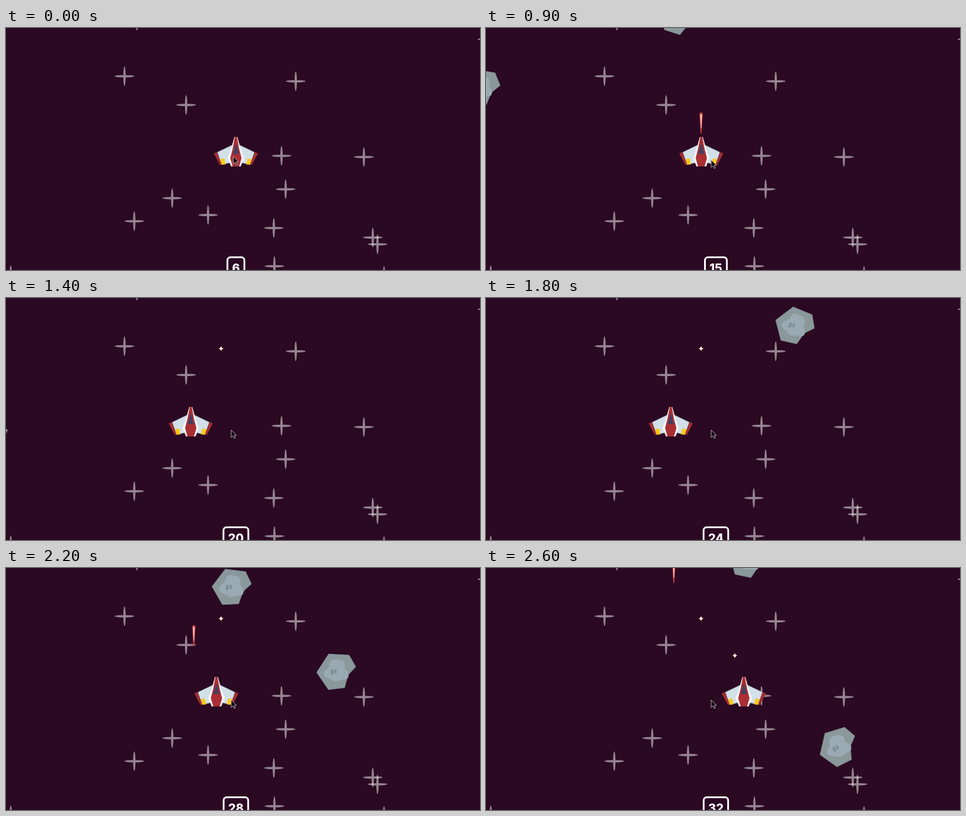
Recreate the animation shown at these times as an HTML page with a canvas. Size 800x409 px, loop 2700 ms.

```html
<!DOCTYPE html>
<html lang="en">
<head>
<meta charset="utf-8">
<title>Space shooter</title>
<style>
html, body { margin: 0; width: 100%; height: 100%; overflow: hidden; background: #2b0922; }
canvas { display: block; }
</style>
</head>
<body>
<canvas id="stage" width="800" height="409"></canvas>
<script>
const ctx = document.getElementById('stage').getContext('2d');
const LOOP = 2700, STEP = 100, TAU = Math.PI * 2;
const BACKGROUND = '#2b0922';
const CENTER = 388, SHIP_Y = 184, SHIP_SPEED = 0.2;
const BULLET_SPEED = 0.267, SPIN = -0.05, HIT_RADIUS = 38;

const stars = [
  [221, -12], [200, 81.5], [304, 130], [489, 90], [812, 19], [465, 216],
  [604, 218], [472, 272.5], [280.5, 287.5], [216.5, 326.5], [341, 316],
  [452, 338], [619, 354], [627, 365.5], [453, 402.5], [8, 418], [638, 419]
];

// Each rock crosses the top edge at time `enter`, at `x`, tilted by `angle`.
const rocks = [
  { enter: 543, x: 3, vx: -0.034, vy: 0.28, angle: 11 },
  { enter: 969, x: 330, vx: 0.05, vy: 0.29, angle: 6.5 },
  { enter: 1654, x: 508, vx: 0.0915, vy: 0.319, angle: 13 },
  { enter: 2091, x: 371, vx: 0.095, vy: 0.29, angle: -4.5 },
  { enter: 2651, x: 446, vx: 0.05, vy: 0.29, angle: 2 }
];

const shots = [
  { x: 363, fired: 873, hit: 1182 },
  { x: 317, fired: 2000, hit: Infinity },
  { x: 420, fired: 2525, hit: 2600 }
];

const keyPresses = [
  { down: 750, up: 873, dir: -1 },
  { down: 1040, up: 1298, dir: -1 },
  { down: 1983, up: 2600, dir: 1 }
];

const clamp = (v, min, max) => Math.max(min, Math.min(max, v));

const shipX = t => keyPresses.reduce(
  (x, { down, up, dir }) => x + dir * SHIP_SPEED * (clamp(t, down, up) - down), CENTER);

const shotY = (shot, t) => 168 - (t - shot.fired) * BULLET_SPEED;

const rockAt = (rock, t) => {
  const age = t - rock.enter;
  return { x: rock.x + rock.vx * age, y: rock.vy * age, angle: rock.angle + SPIN * age };
};

const destroyed = (rock, t) => shots.some(shot => {
  if (t < shot.hit) return false;
  const { x, y } = rockAt(rock, shot.hit);
  return Math.hypot(x - shot.x, y - shotY(shot, shot.hit)) < HIT_RADIUS;
});

function poly(points, fill, stroke, width = 1) {
  ctx.beginPath();
  points.forEach(([x, y]) => ctx.lineTo(x, y));
  ctx.closePath();
  ctx.fillStyle = fill;
  ctx.fill();
  if (stroke) {
    ctx.strokeStyle = stroke;
    ctx.lineWidth = width;
    ctx.stroke();
  }
}

// Closed outline from a radius that depends on the angle.
const ring = (count, radius) => Array.from({ length: count }, (_, i) => {
  const a = i * TAU / count, r = radius(a, i);
  return [r * Math.cos(a), r * Math.sin(a)];
});

// Completes the right half of a shape with its left half.
const mirrored = half => [...half, ...half.map(([x, y]) => [-x, y]).reverse()];

function placed(x, y, draw, angle = 0, scaleX = 1) {
  ctx.save();
  ctx.translate(x, y);
  ctx.rotate(angle * Math.PI / 180);
  ctx.scale(scaleX, 1);
  draw();
  ctx.restore();
}

function drawStar() {
  const long = 16.5, thin = 2;
  ctx.beginPath();
  ctx.ellipse(0, 0, long, thin, 0, 0, TAU);
  ctx.moveTo(thin, 0);
  ctx.ellipse(0, 0, thin, long, 0, 0, TAU);
  ctx.fillStyle = 'rgba(255,255,255,.5)';
  ctx.fill();
}

function drawRock() {
  poly([[-6, -31], [27, -21], [33, 1], [17, 11], [6, 30.5], [-21, 27], [-33, -6]], '#8a989b', '#7f8d91');
  poly(ring(24, a => 18.5 + 2.5 * Math.sin(3 * a - 1) + 2 * Math.cos(5 * a + 3)), '#9aaab2');
  for (const [x, size] of [[-8, 1], [-2, 0.8]]) {
    placed(x, 0, () => poly(ring(16, a => size * (3.6 - 1.2 * Math.cos(2 * a))), '#7f9097'), 12);
  }
}

function drawWing() {
  poly([[6, 14], [31, 26], [25, 47], [8, 43]], '#d2e0e8', '#a9bdca');
  poly([[32, 26], [37, 28], [27, 47], [24, 47]], '#a82f32', '#7c2530', 0.8);
  poly([[19.5, 37], [26, 37], [24, 47], [17.5, 46.5]], '#fbc911');
}

function drawShip() {
  const hull = mirrored([[2.5, 0], [8, 20], [14, 36], [8, 50]]);
  [1, -1].forEach(side => placed(0, 0, drawWing, 0, side));
  poly(hull, '#f5f6f8');
  placed(0, 0, () => poly(hull, '#aa2e33'), 0, 0.68);
  poly(mirrored([[1, 13], [5, 29]]), '#44405f');
}

function drawBullet() {
  poly(mirrored([[1.5, -18], [3, -15], [0.8, 18]]), '#b93b3d');
  poly(mirrored([[1.2, -15], [0.4, 9]]), '#ffe3dc');
}

function drawSpark() {
  const shape = size => ring(8, (a, i) => i % 2 ? size * 0.48 : size);
  poly(shape(4.2), '#e8a595');
  poly(shape(3.4), '#fffaf0');
}

function drawCursor() {
  poly([[0, 0], [0, 12.5], [3, 10], [5.2, 14.5], [7.2, 13.5], [5.2, 9], [9, 9]], '#0c0609', '#c8bec6', 0.9);
}

function drawCounter(value) {
  ctx.font = '800 20px Inter, Arial, sans-serif';
  ctx.textAlign = 'center';
  const width = ctx.measureText(value).width + 15.4;
  ctx.beginPath();
  ctx.roundRect(CENTER - width / 2, 387.5, width, 34, 5);
  ctx.fillStyle = BACKGROUND;
  ctx.fill();
  ctx.strokeStyle = '#fff';
  ctx.lineWidth = 3;
  ctx.stroke();
  ctx.fillStyle = '#fff';
  ctx.fillText(value, CENTER, 412.5);
}

function render(t) {
  ctx.fillStyle = BACKGROUND;
  ctx.fillRect(0, 0, 800, 409);
  stars.forEach(([x, y]) => placed(x, y, drawStar));
  const fired = shots.filter(shot => t >= shot.fired);
  fired.filter(shot => t < shot.hit).forEach(shot => placed(shot.x, shotY(shot, t), drawBullet));
  placed(shipX(t), SHIP_Y, drawShip);
  rocks.filter(rock => !destroyed(rock, t)).forEach(rock => {
    const { x, y, angle } = rockAt(rock, t);
    placed(x, y, drawRock, angle);
  });
  fired.filter(shot => t >= shot.hit).forEach(shot => placed(shot.x, shotY(shot, shot.hit), drawSpark));
  drawCounter(String(6 + t / STEP));
  const drift = clamp(t / 300, 0, 1);
  placed(383.5 - 3.5 * drift, 217 + 6 * drift, drawCursor);
}

const start = performance.now();
function tick() {
  const t = (performance.now() - start) % LOOP;
  render(Math.floor(t / STEP) * STEP);
  requestAnimationFrame(tick);
}
tick();
</script>
</body>
</html>
```
